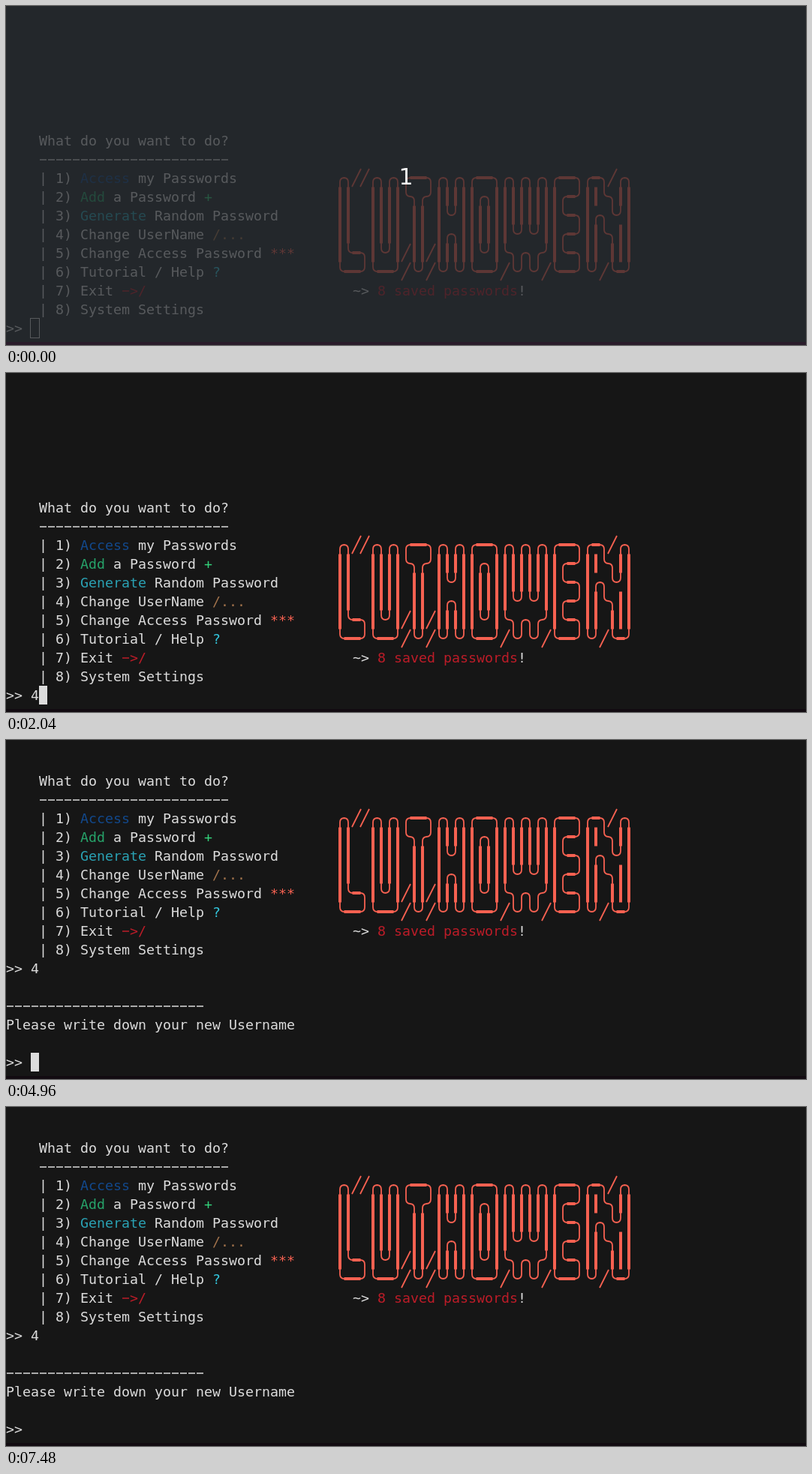
These frames come from a looping animation (1066x452 px, 8000 ms). An HTML page:

```html
<!DOCTYPE html>
<html lang="en">
<head>
<meta charset="utf-8">
<title>Password menu</title>
<style>
  html, body { margin: 0; width: 100%; height: 100%; overflow: hidden; background: #161616; }
  svg { display: block; width: 100vw; height: 100vh; }
  text { font: 18.27px "DejaVu Sans Mono", monospace; white-space: pre; }
</style>
</head>
<body>
<svg id="stage" viewBox="0 0 1066 452">
  <rect id="back" width="1066" height="452"/>
  <rect id="edge" y="448" width="1066" height="4"/>
  <g id="term">
    <g id="menu"></g>
    <g id="form"></g>
    <g id="prompt"></g>
    <rect id="cursor" y="417" width="11" height="25" fill="#dcdcdc"/>
    <rect id="frame" x="32.5" y="416.5" width="12" height="26" fill="none" stroke="#dcdcdc"/>
  </g>
  <text id="badge" x="533" y="238" text-anchor="middle" fill="#f4f4f4" style="font:30px 'DejaVu Sans', sans-serif">1</text>
</svg>
<script>
const NS = 'http://www.w3.org/2000/svg';
const CW = 11, RH = 25, TOP = 167;
const LOOP = 8000;
const WHITE = '#dcdcdc', RED = '#bc1c28', CORAL = '#f66151';
const $ = id => document.getElementById(id);

function add(parent, tag, attrs, content = '') {
  const el = document.createElementNS(NS, tag);
  for (const key in attrs) el.setAttribute(key, attrs[key]);
  el.textContent = content;
  parent.appendChild(el);
  return el;
}

// Writes [text, colour] parts from a column on; rows count from the menu heading.
function write(parent, col, row, ...parts) {
  for (const [str, fill = WHITE] of parts) {
    add(parent, 'text', { x: col * CW, y: TOP + row * RH + 19, fill }, str);
    col += str.length;
  }
}

function dashes(parent, col, row, count, stroke = WHITE) {
  add(parent, 'path', {
    d: `M${col * CW + 1} ${TOP + row * RH + 13}h${count * CW - 2}`,
    stroke, 'stroke-width': 1.5, 'stroke-dasharray': '9 2', fill: 'none'
  });
}

const menu = $('menu'), form = $('form'), prompt = $('prompt');

write(menu, 4, 0, ['What do you want to do?']);
dashes(menu, 4, 1, 23);
[
  [['Access', '#12488b'], [' my Passwords']],
  [['Add', '#26a269'], [' a Password '], ['+', '#33d17a']],
  [['Generate', '#2aa1b3'], [' Random Password']],
  [['Change UserName '], ['/...', '#a2734c']],
  [['Change Access Password '], ['***', CORAL]],
  [['Tutorial / Help '], ['?', '#33c7de']],
  [['Exit '], [' >/', RED]],
  [['System Settings']]
].forEach((parts, i) => write(menu, 4, i + 2, [`| ${i + 1}) `], ...parts));
dashes(menu, 14, 8, 1, RED);
write(menu, 42, 8, ['~> '], ['8 saved passwords', RED], ['!']);

// Banner built from box-drawing cells.
const banner = [
  '╭╮╱╱╭╮╭╮╭━━╮╭╮╭╮╭━━╮╭╮╭╮╭╮╭━━╮╭━╮╱╭╮',
  '┃┃  ┃┃┃┃╰╮╭╯┃┃┃┃┃╭╮┃┃┃┃┃┃┃┃╭━╯┃┃╰╮┃┃',
  '┃┃  ┃┃┃┃ ┃┃ ┃╰╯┃┃┃┃┃┃┃┃┃┃┃┃╰━╮┃╭╮╰╯┃',
  '┃┃  ┃┃┃┃ ┃┃ ┃╭╮┃┃┃┃┃┃╰╯╰╯┃┃╭━╯┃┃╰╮┃┃',
  '┃╰━╮┃╰╯┃╱┃┃╱┃┃┃┃┃╰╯┃╰╮╭╮╭╯┃╰━╮┃┃ ┃┃┃',
  '╰━━╯╰━━╯╱╰╯╱╰╯╰╯╰━━╯╱╰╯╰╯╱╰━━╯╰╯╱╰━╯'
];
const corner = (sx, sy) => `m0 ${13 * sy}v${-7 * sy}q0 ${-6 * sy} ${6 * sx} ${-6 * sy}`;
const thin = {
  '╭': corner(1, 1), '╮': corner(-1, 1), '╰': corner(1, -1), '╯': corner(-1, -1),
  '╱': 'm-6 12l12 -24'
};
const heavy = { '━': 'm-5.5 0h11', '┃': 'm0 -12.5v25' };

function drawBanner(shapes, width) {
  let d = '';
  banner.forEach((line, r) => [...line].forEach((ch, c) => {
    if (shapes[ch]) d += `M${445 + c * CW} ${229 + r * RH}${shapes[ch]}`;
  }));
  add(menu, 'path', { d, fill: 'none', stroke: CORAL, 'stroke-width': width });
}
drawBanner(thin, 1.8);
drawBanner(heavy, 4);

write(form, 0, 5, ['>> 4']);
dashes(form, 0, 7, 24);
write(form, 0, 8, ['Please write down your new Username']);

write(prompt, 0, 10, ['>>']);
write(prompt, 3, 10, ['4']);
const typed = prompt.lastChild;

const blinks = [1440, 2040, 3160, 3760, 4360, 4960, 5560, 5640, 6280, 6880, 7480];
const show = (el, on) => el.setAttribute('display', on ? 'inline' : 'none');

function render(t) {
  const dim = t < 40;
  const asking = t >= 2600;
  const hasDigit = t >= 880 && !asking;
  const lit = blinks.filter(b => t >= b).length % 2 === 0;

  $('back').setAttribute('fill', dim ? '#23272b' : '#161616');
  $('edge').setAttribute('fill', dim ? '#2a1c2b' : '#120b11');
  $('term').setAttribute('opacity', dim ? 0.28 : 1);
  menu.setAttribute('transform', `translate(0 ${asking ? -5 * RH : 0})`);
  $('cursor').setAttribute('x', hasDigit ? 44 : 33);
  show(form, asking);
  show(typed, hasDigit);
  show($('cursor'), lit && !dim);
  show($('frame'), dim);
  show($('badge'), dim);
}

const start = performance.now();
function tick() {
  render((performance.now() - start) % LOOP);
  requestAnimationFrame(tick);
}
render(0);
requestAnimationFrame(tick);
</script>
</body>
</html>
```
